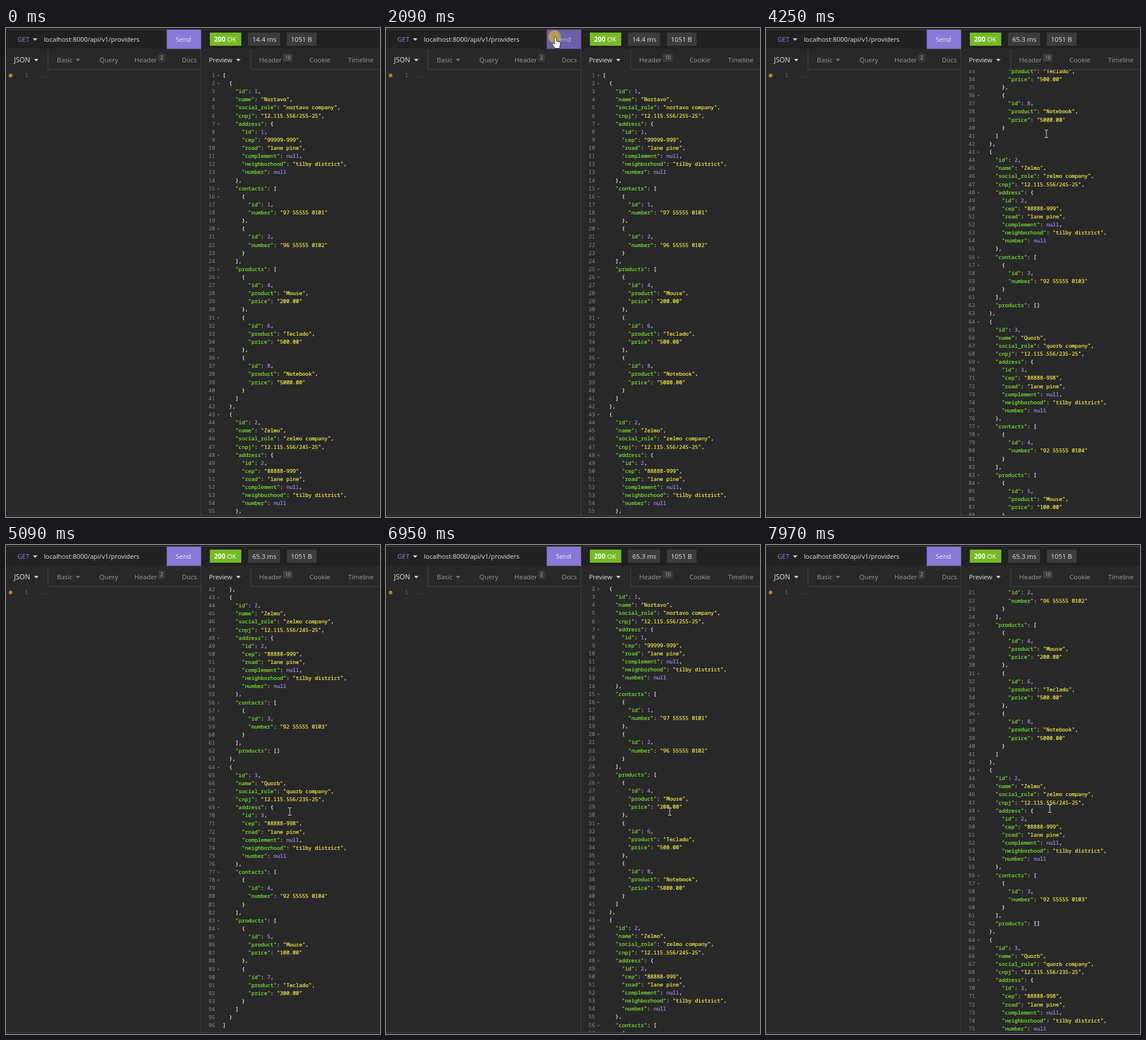
These frames come from a looping animation (655 by 855 pixels, 8 s). An HTML page:

```html
<!DOCTYPE html>
<html lang="en">
<head>
<meta charset="utf-8">
<title>REST client</title>
<style>
html, body { margin: 0; width: 100%; height: 100%; overflow: hidden; background: #282828; }
svg { position: absolute; left: 0; top: 0; width: 655px; height: 855px; }
svg text { font-family: "Open Sans", "Noto Sans", sans-serif; font-size: 11.5px; fill: #9c9c9c; }
svg .on { fill: #e6e6e6; }
svg .badge { font-size: 8.5px; fill: #b4b4b4; text-anchor: middle; }
.line { stroke: #434343; fill: none; }
#view { position: absolute; left: 342px; top: 73px; width: 313px; height: 779px; overflow: hidden; }
.row, .mono {
  position: absolute; white-space: pre; color: #f8f8f8;
  font: 500 9.29px/14.12px "Noto Sans Mono", "DejaVu Sans Mono", monospace;
}
.row { left: 37.5px; -webkit-text-stroke: .2px; }
.num { position: absolute; right: calc(100% + 13.5px); color: #7e7e7e; }
.fold { position: absolute; left: -9.5px; top: 6px; border: 2.5px solid transparent; border-top: 3px solid #666; border-bottom: 0; }
.key { color: #7cec32; }
.str { color: #fff44c; }
.val { color: #aa92fa; }
.dim { color: #7a7a7a; }
</style>
</head>
<body>
<svg viewBox="0 0 655 855">
  <rect width="655" height="855" fill="#282828"/>
  <rect width="655" height="36" fill="#212121"/>
  <path class="line" d="M0 2.5H655M0 852.5H655M341.5 3V852M73.5 37V72.5H341M428.5 37V72.5H655"/>
  <rect id="send" x="281.5" y="3" width="60" height="33.5"/>
  <text x="20" y="24" style="fill:#9385e0">GET</text>
  <text x="66.5" y="24" class="on" style="font-size:11.35px">localhost:8000/api/v1/providers</text>
  <text x="297.5" y="24" id="label">Send</text>
  <rect x="357" y="8" width="55" height="23" fill="#75ba24"/>
  <text x="364.5" y="24" style="fill:#fff"><tspan font-weight="700">200</tspan> OK</text>
  <g fill="#3c3c3c">
    <rect x="424" y="8" width="56" height="23"/>
    <rect x="492" y="8" width="52" height="23"/>
    <rect x="267" y="45" width="11" height="14"/>
    <rect x="485" y="45" width="17" height="14"/>
  </g>
  <text x="431.5" y="24" class="on" id="took">14.4 ms</text>
  <text x="499" y="24" class="on">1051 B</text>
  <text x="14" y="60" class="on" style="font-size:12px">JSON</text>
  <text x="89" y="60">Basic</text>
  <text x="163.5" y="60">Query</text>
  <text x="225" y="60">Header</text>
  <text x="272.5" y="55" class="badge">2</text>
  <text x="308" y="60">Docs</text>
  <text x="355.5" y="60" class="on" style="font-size:11.3px">Preview</text>
  <text x="443.5" y="60">Header</text>
  <text x="493.5" y="55" class="badge">10</text>
  <text x="531.5" y="60">Cookie</text>
  <text x="599" y="60" style="font-size:11.2px">Timeline</text>
  <path fill="#d0d0d0" d="M47 18h8l-4 4.5zM49 54h8l-4 4.5zM403 54h8l-4 4.5z"/>
  <path fill="#777" d="M122 54h8l-4 4.5z"/>
  <circle cx="8" cy="83" r="3.2" fill="#c67c2a"/>
</svg>
<div class="mono dim" style="left:33px;top:76px">1</div>
<div class="mono dim" style="left:53px;top:76px">...</div>
<div id="view"><div id="code"></div></div>
<svg viewBox="0 0 655 855">
  <rect id="shade" x="342" y="3" width="313" height="849" fill="#1e1e1e"/>
  <circle id="click" cx="295" cy="15" r="11" fill="#b5a450" opacity=".92"/>
  <g id="cursor">
    <path id="arrow" d="M0 0V15.5L3.6 12.2 6 17.8 8.4 16.8 6 11.3H11Z" fill="#fff" stroke="#000" stroke-width=".8"/>
    <path id="hand" d="M-2 1.6a1.8 1.8 0 0 1 3.6 0V7l5.4 1.4q1.5.6 1.4 2.5l-.6 4.4-1.2 4.2h-7.6l-4.6-6.8q-.7-1.8 1-2.2l2.6 1.6z" fill="#fff" stroke="#000" stroke-width=".8"/>
    <path id="beam" d="M-3-6.5h2.2L0-6 .8-6.5H3M0-6V6M-3 6.5h2.2L0 6 .8 6.5H3" fill="none" stroke="#e4e4e4"/>
  </g>
</svg>
<script>
const LOOP = 8000, PITCH = 14.12;
const $ = id => document.getElementById(id);

const provider = (id, name, code, cep, contacts, products) => ({
  id, name,
  social_role: name.toLowerCase() + ' company',
  cnpj: `12.115.556/${code}-25`,
  address: { id, cep, road: 'lane pine', complement: null, neighborhood: 'tilby district', number: null },
  contacts: contacts.map(([id, number]) => ({ id, number })),
  products: products.map(([id, product, price]) => ({ id, product, price }))
});

const data = [
  provider(1, 'Nortavo', 255, '99999-999',
    [[1, '97 55555 0101'], [2, '96 55555 0102']],
    [[4, 'Mouse', '200.00'], [6, 'Teclado', '500.00'], [8, 'Notebook', '5000.00']]),
  provider(2, 'Zelmo', 245, '88888-999', [[3, '92 55555 0103']], []),
  provider(3, 'Quorb', 235, '88888-998', [[4, '92 55555 0104']],
    [[5, 'Mouse', '100.00'], [7, 'Teclado', '300.00']])
];

const paint = line => line.replace(/("[^"]*")(:?)|\bnull\b|\b\d+\b/g, (all, str, colon) =>
  !str ? `<span class="val">${all}</span>`
    : `<span class="${colon ? 'key' : 'str'}">${str}</span>${colon}`);

$('code').innerHTML = JSON.stringify(data, null, 2).split('\n').map((line, i) =>
  `<div class="row" style="top:${(3 + i * PITCH).toFixed(2)}px"><span class="num">${i + 1}</span>` +
  (/[{[]$/.test(line) ? '<i class="fold"></i>' : '') + paint(line) + '</div>').join('');

// Bursts of movement: start, end, number of intervals
const bursts = [[550, 1330, 11], [1400, 1820, 6], [3300, 4050, 10], [4250, 5020, 11],
  [5090, 5840, 11], [5910, 6290, 5], [6950, 7230, 4], [7630, 7970, 4]];

const scroll = [[3680, 0], [4050, 438], [4180, 438], [4250, 458.5], [4600, 584], [5160, 584],
  [5910, 208], [6290, 0], [6880, 0], [6950, 20], [7230, 141], [7560, 141], [7630, 161], [7970, 281.5]];

const pointer = [[550, 610, 812], [800, 510, 520], [1330, 262, 34], [1400, 270, 30], [1820, 297, 16],
  [3230, 297, 16], [3300, 308, 23], [3680, 491, 185], [4600, 491, 185], [5020, 497, 466],
  [7630, 497, 466], [7970, 497, 461]];

function snap(t) {
  let at = 0;
  for (const [start, end, n] of bursts) {
    if (t < start) break;
    const step = (end - start) / n;
    at = Math.min(end, start + Math.floor((t - start) / step + 1e-6) * step);
  }
  return at;
}

function sample(points, t, k = 1) {
  const next = points.findIndex(p => p[0] > t);
  if (next === 0) return points[0][k];
  if (next < 0) return points[points.length - 1][k];
  const a = points[next - 1], b = points[next];
  return a[k] + (b[k] - a[k]) * (t - a[0]) / (b[0] - a[0]);
}

const show = (id, on) => { $(id).style.display = on ? '' : 'none'; };

function draw(t) {
  const at = snap(t);
  const x = Math.round(sample(pointer, at, 1)), y = Math.round(sample(pointer, at, 2));
  const hover = t >= 550 && x >= 282 && x < 341 && y < 36;
  const text = !hover && y > 73;

  $('code').style.transform = `translateY(${-Math.round(sample(scroll, at))}px)`;
  $('cursor').setAttribute('transform', `translate(${x} ${y})`);
  show('cursor', t >= 550);
  show('hand', hover);
  show('beam', text);
  show('arrow', !hover && !text);
  show('click', t >= 2090 && t < 2290);
  $('send').style.fill = hover ? '#6c5fa9' : '#8978d7';
  $('label').style.fill = hover ? '#c4bfda' : '#f2f0fb';
  $('took').textContent = t < 2770 ? '14.4 ms' : '65.3 ms';
  $('shade').style.opacity = t < 2290 || t >= 2840 ? 0 : t < 2770 ? .6 : .3;
}

function tick() {
  draw(performance.now() % LOOP);
  requestAnimationFrame(tick);
}
tick();
</script>
</body>
</html>
```
